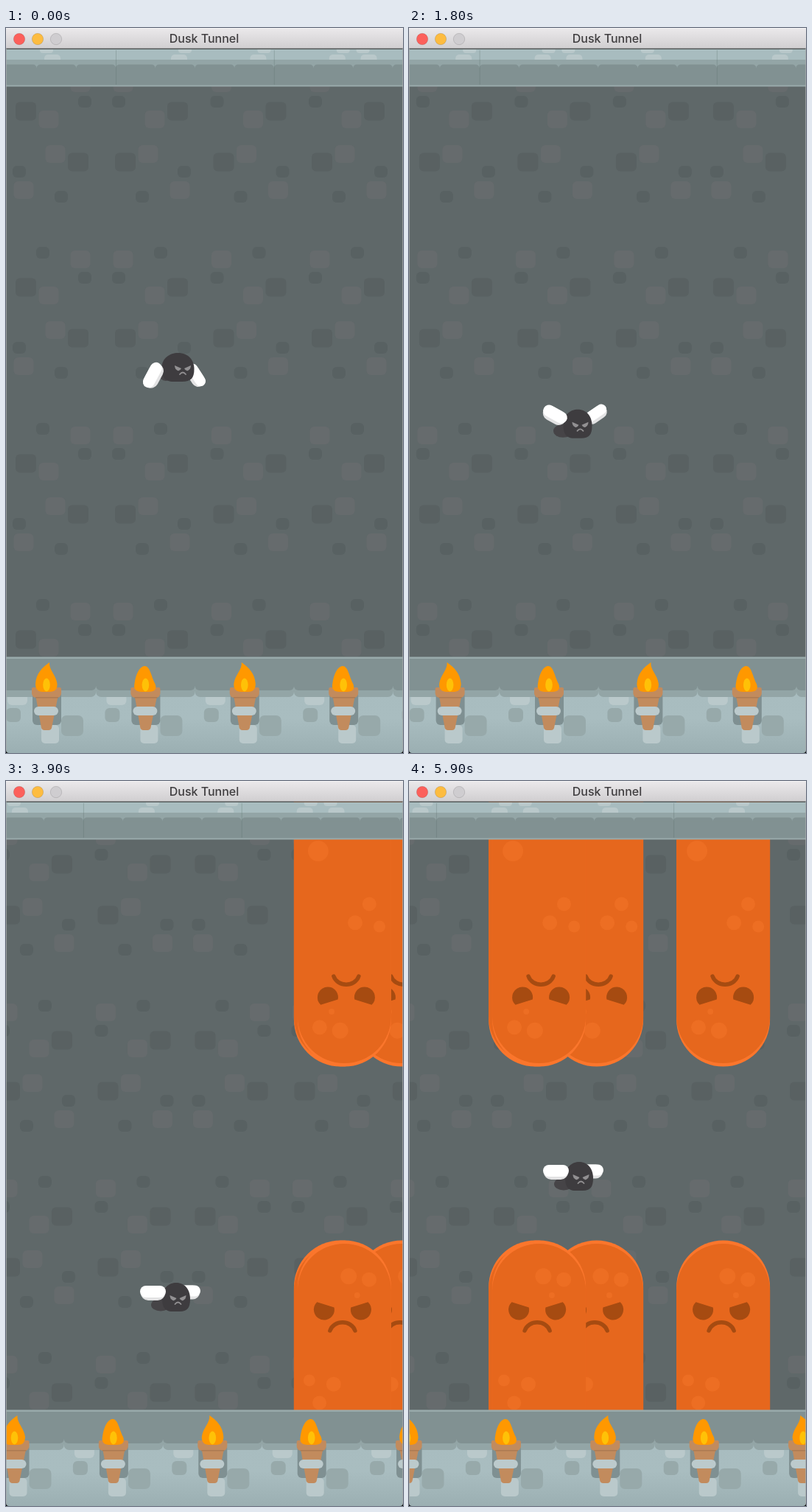
Animation, 539 px wide and 984 px high, one loop 6 s. Source, as an HTML page with a canvas:

```html
<!DOCTYPE html>
<html lang="en">
<head>
<meta charset="utf-8">
<title>Dusk Tunnel</title>
<style>
html, body { margin: 0; height: 100%; overflow: hidden; background: #5f6869; }
canvas { display: block; }
</style>
</head>
<body>
<canvas id="stage" width="539" height="984"></canvas>
<script>
const W = 539, H = 984, LOOP = 6000, STEP = 100;
const c = document.getElementById('stage').getContext('2d');

function fill(x, y, w, h, color) {
  c.fillStyle = color;
  c.fillRect(x, y, w, h);
}
function box(x, y, w, h, r, color) {
  c.fillStyle = color;
  c.beginPath();
  c.roundRect(x, y, w, h, r);
  c.fill();
}
function oval(x, y, rx, ry, color) {
  c.fillStyle = color;
  c.beginPath();
  c.ellipse(x, y, rx, ry, 0, 0, 7);
  c.fill();
}
function shape(d, color) {
  c.fillStyle = color;
  c.fill(new Path2D(d));
}
function line(d, color, width) {
  c.strokeStyle = color;
  c.lineWidth = width;
  c.lineCap = 'round';
  c.stroke(new Path2D(d));
}
function at(x, y, draw, sx = 1, sy = 1, turn = 0) {
  c.save();
  c.translate(x, y);
  c.rotate(turn);
  c.scale(sx, sy);
  draw();
  c.restore();
}
// Repeats a drawing every `size` pixels across the stage, moved left by `shift`
function tiles(start, size, shift, draw) {
  const first = Math.floor((shift - start) / size) - 1;
  for (let i = first; start + i * size - shift < W + size; i++) draw(start + i * size - shift, i);
}
function shade(y0, y1, ...colors) {
  const g = c.createLinearGradient(0, y0, 0, y1);
  colors.forEach((color, i) => g.addColorStop(i / (colors.length - 1), color));
  return g;
}
const mod = (n, m) => ((n % m) + m) % m;

// Steady speed that drags a little near the end of the loop
const scrolled = t => .149 * t - .019 * Math.max(0, t - 5100);

// Every brick has a partner turned half around the middle of the tile
function bricks() {
  const pair = (x, y, w, h, color) => {
    for (const [px, py] of [[x, y], [135 - x, 295 - y]])
      for (let row = -1; row < 4; row++) box(px - w / 2, py + 239 * row - h / 2, w, h, 6, color);
  };
  const light = (x, y) => pair(x, y, 27, 24, '#666b6d');
  const big = (x, y) => pair(x, y, 28, 25, '#596162');
  const small = (x, y) => pair(x, y, 18, 16, '#586162');
  light(29, 75);
  light(72, 124);
  big(103, 113);
  small(23, 100);
  small(80, 66);
}
function wall(shift) {
  fill(0, 0, W, H, '#5f6869');
  tiles(-3.5, 133.5, shift, (x, i) => {
    const flip = mod(i, 4) === 0;
    at(flip ? x + 133.5 : x, 0, bricks, flip ? -1 : 1);
  });
}

function bubbles(x, y, spread, radii) {
  radii.forEach((r, i) => {
    const a = 2.15 * i - 1.5;
    oval(x + spread * Math.cos(a), y + spread * Math.sin(a), r, r, '#ed6e23');
  });
}
function column() {
  const dark = '#a64b11', round = [0, 0, 63.5, 63.5];
  box(0, 0, 127, 387.5, round, '#fb762c');
  box(0, 0, 127, 383, round, '#e6671d');
  bubbles(27, 109, 14, [14]);
  bubbles(96, 186, 19, [9.5, 8, 10]);
  bubbles(45, 329, 16, [4, 11, 10]);
  for (const side of [-1, 1]) at(66, 293.5, () => {
    c.fillStyle = dark;
    c.beginPath();
    c.arc(25, 0, 14, 2.92, 7.1);
    c.fill();
  }, side);
  line('M49 265C54 280 78 280 83 265', dark, 5.5);
}
function pipes(shift) {
  for (const world of [1227, 1055, 972, 977]) {
    at(world - shift, 0, column);
    at(world - shift + 127, 1011, column, -1, -1);
  }
}

function ceiling(shift) {
  fill(0, 29, W, 15, '#a8bcbf');
  fill(0, 43, W, 36, '#93a5a6');
  fill(0, 54, W, 24, '#819192');
  tiles(149, 107.4, shift, (x, i) => {
    const n = mod(i, 5), flip = n > 2;
    at(flip ? x + 107.4 : x, 0, () => {
      box(75, 36, 22, 8, [5, 5, 0, 0], '#b9c8ca');
      box(85, 29, 18, 5, [0, 0, 4, 4], '#b9c8ca');
      for (const half of [0, 53.7]) {
        box(half, 43, 53.7, 6, [4, 4, 0, 0], '#93a5a6');
        box(half, 49.5, 53.7, 5, [5, 5, 0, 0], '#819192');
      }
    }, flip ? -1 : 1);
    if (n === 0 || n === 2) fill(x, 30, 1, 47, 'rgba(90,110,108,.3)');
  });
  fill(0, 77.5, W, 2, '#99aaab');
}

function torch(tall, lean) {
  box(-19, 900, 39, 46, 6, '#7f9092');
  shape('M-15 905H16L7 950Q6 953 3 953H-3Q-6 953 -7 950Z', '#c28b5d');
  box(-20, 895, 40, 14, [2, 2, 6, 6], '#c28b5d');
  fill(-15, 908, 31, 1.5, '#ad7b52');
  box(-17, 921, 33, 12, 6, '#bccacc');
  at(0, 0, () => shape(tall
    ? 'M4 861C3 871 13 878 14.5 890Q15 901 4 901H-5Q-15 901 -15 890C-14 876 -6 868 4 861Z'
    : 'M-2 866C6 865 7 878 13 890Q17 901 4 901H-5Q-17 901 -15 890C-13 877 -9 868 -2 866Z', '#ff9800'), tall ? lean : 1);
  oval(0, 891.5, 4.8, 9, '#ffc107');
}
function ground(shift, t) {
  const flicker = Math.cos(2 * Math.PI * t / 1000) > 0 ? 1 : -1;
  fill(0, 854, W, 130, shade(890, H, '#a8bcbf', '#a9bdc0', '#9bafb2'));
  fill(0, 856, W, 44, '#93a5a6');
  fill(0, 856, W, 37, '#819192');
  tiles(55, 134.4, shift, (x, i) => at(x, 0, () => {
    box(-67.2, 899, 134.4, 9, [0, 0, 7, 7], '#93a5a6');
    box(-67.2, 892, 134.4, 7, [0, 0, 6, 6], '#819192');
    box(-53, 908, 27, 11, [0, 0, 6, 6], '#bac9cb');
    box(-55, 923, 20, 19, 6, '#97a9aa');
    box(20, 933, 30, 28, 7, '#97a9aa');
    box(-7, 946, 24, 25, 5, '#bac9cb');
    torch(i % 2 === 0, i % 4 ? -flicker : flicker);
  }));
  fill(0, 853.5, W, 2.5, '#99aaab');
}

function wing(x, y, w, h, turn) {
  at(x, y, () => {
    box(1 - w / 2, -h / 2, w - 2, h, h / 2, '#e3e3e4');
    box(-w / 2, -h / 2, w, h - 4, h / 2, '#fff');
  }, 1, 1, turn);
}
function face() {
  const grey = '#929092';
  for (const side of [-1, 1])
    at(0, 0, () => shape('M11 -5L2 -1Q4 3 7 2Q11 0 11 -5Z', grey), side);
  line('M-4 7Q0 2 4 7', grey, 1.8);
}
function body(x, r) {
  at(x, 0, () => shape('M-20 20C-20 7 -10 0 0 0C13 0 20 10 20 22C20 34 16 39 5 39H-5C-18 39 -20 31 -20 20Z', '#3e3c3f'), r / 20);
}
function bat(pose) {
  const down = () => {
    wing(257, 31, 34, 18, 1);
    oval(217, 29, 9, 9, '#464447');
    body(233.5, 22);
    at(240, 22, face);
    wing(200.5, 31, 37, 20, -1.08);
  };
  const up = () => {
    wing(254, 7, 34, 18, -.6);
    oval(209, 29, 13, 9, '#464447');
    body(229, 19.5);
    at(232.5, 22, face);
    wing(197.5, 8, 35, 20, .5);
  };
  const level = () => {
    wing(247, 13, 34, 19, 0);
    oval(210, 30, 13, 8.5, '#464447');
    body(231, 19);
    at(233.5, 22, face);
    wing(199.5, 14, 35, 20, 0);
  };
  [down, up, level][pose]();
}
// Small hops between a few resting heights
function batTop(t) {
  const stops = [[0, 441], [1300, 500], [2400, 572], [3100, 584], [3900, 681], [5100, 572], [LOOP - STEP, 517], [LOOP, 510]];
  const next = stops.findIndex(([time]) => time > t);
  const [t0, y0] = stops[next - 1], [t1, y1] = stops[next];
  const u = (t - t0) / (t1 - t0);
  return y0 + (y1 - y0) * u - 60 * u * (1 - u);
}

function windowFrame() {
  fill(0, 0, W, 28, shade(0, 28, '#ebe9eb', '#d0ced0'));
  fill(0, 0, W, 1, '#f5f4f5');
  fill(0, 27.5, W, 1.5, 'rgba(70,75,75,.75)');
  ['#fc605b', '#fdbc40', '#cfcdd0'].forEach((color, i) => {
    oval(18 + 25 * i, 15, 7.7, 7.7, color);
    c.strokeStyle = 'rgba(0,0,0,.12)';
    c.lineWidth = 1;
    c.stroke();
  });
  c.fillStyle = '#403e40';
  c.font = '500 16px Inter, Roboto, sans-serif';
  c.textAlign = 'center';
  c.textBaseline = 'middle';
  c.fillText('Dusk Tunnel', 269, 15.5);
  for (const x of [0, W - 1]) fill(x, 28, 1, H, 'rgba(165,170,170,.75)');
  shape('M0 980Q0 984 4 984H0ZM539 980Q539 984 535 984H539Z', '#000');
}

const begin = performance.now();
function render() {
  const t = Math.floor((performance.now() - begin) % LOOP / STEP) * STEP;
  const shift = scrolled(t);
  wall(shift / 2);
  pipes(shift);
  ceiling(shift);
  ground(shift, t);
  at(0, batTop(t), () => bat(Math.round(t * .009) % 3));
  windowFrame();
  requestAnimationFrame(render);
}
render();
</script>
</body>
</html>
```
